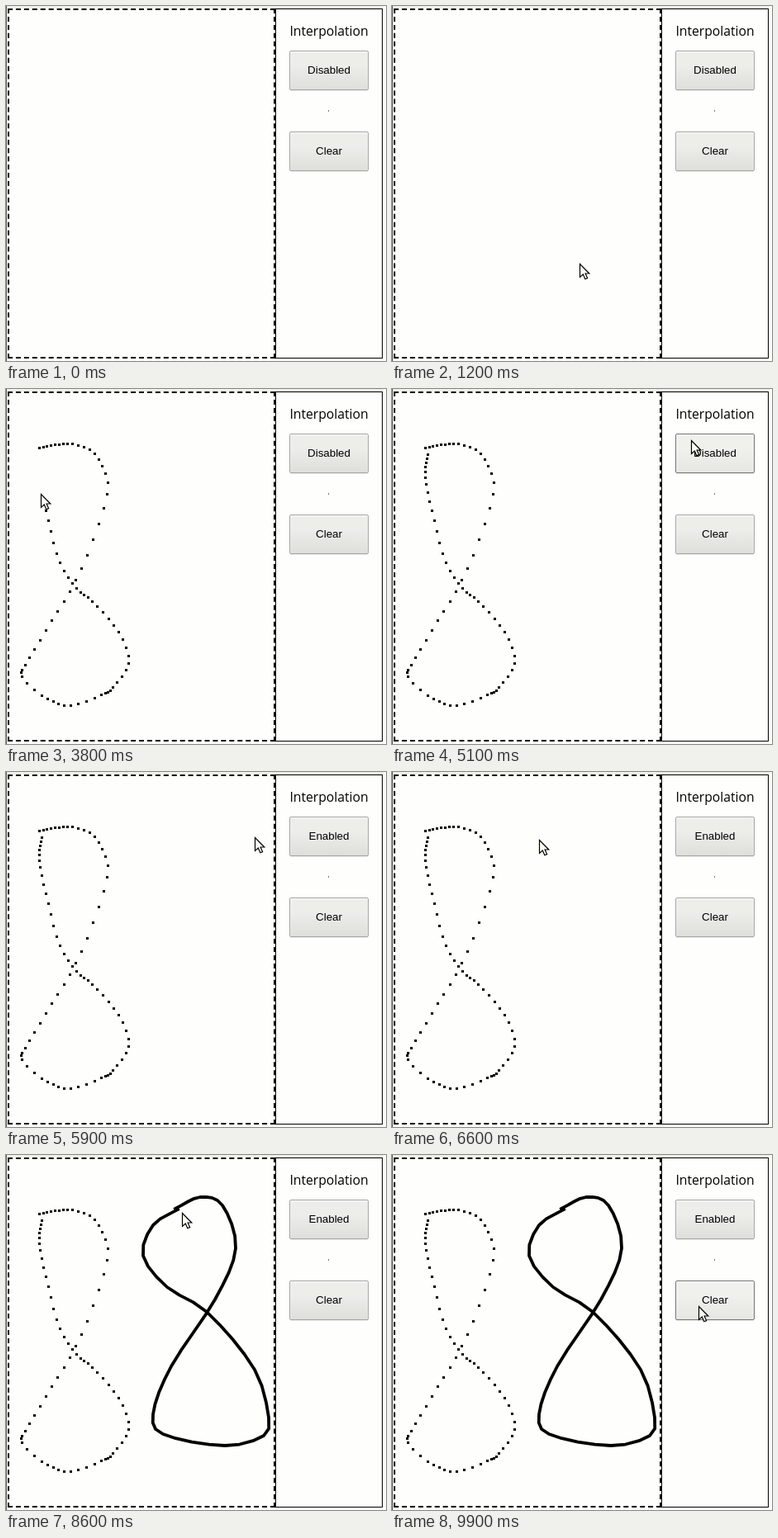
Write an HTML page that moves like this. It is 460 px wide and 430 px high and loops after 10 s.

```html
<!DOCTYPE html>
<html lang="en">
<head>
<meta charset="utf-8">
<title>Interpolation</title>
<style>
html, body { margin: 0; width: 100%; height: 100%; overflow: hidden; background: #fefefc; }
body > * { position: absolute; box-sizing: border-box; }
.top { left: 0; top: 0; width: 457px; height: 3px; background: #f1f1e6; }
.left { left: 0; top: 0; width: 1px; height: 430px; background: #5c554a; }
.pad { left: 2px; top: 3px; width: 324px; height: 424px; border: 2px dashed #000; }
.panel { left: 326px; top: 3px; width: 130px; height: 424px; border: 1px solid #000; }
.title {
  left: 327px; top: 19px; width: 128px; text-align: center; color: #000;
  font: 15.7px/22px "Open Sans", "Noto Sans", sans-serif;
}
.btn {
  left: 343px; width: 96px; height: 48px; border: 1px solid #a5a5a3; border-radius: 2px;
  background: linear-gradient(#ededea, #ededea 38%, #dededa);
  box-shadow: 0 1px 0 rgba(0, 0, 0, .08), inset 0 1px 2px rgba(255, 255, 255, .75);
  color: #000; text-align: center;
  font: 13.33px/46px "Liberation Sans", Arial, sans-serif;
}
.btn.hover { border-color: #747472; background: linear-gradient(#f0f0ed, #f0f0ed 38%, #e6e6e2); }
#toggle { top: 54px; }
#clear { top: 152px; }
.speck { left: 390px; top: 126px; width: 1px; height: 2px; background: #777; }
svg { left: 0; top: 0; }
</style>
</head>
<body>
<div class="top"></div>
<div class="left"></div>
<div class="pad"></div>
<div class="panel"></div>
<div class="title">Interpolation</div>
<div class="btn" id="toggle">Disabled</div>
<div class="speck"></div>
<div class="btn" id="clear">Clear</div>
<svg width="460" height="430" viewBox="0 0 460 430">
  <path id="dots" shape-rendering="crispEdges"/>
  <polyline id="line" fill="none" stroke="#000" stroke-width="3.8" stroke-linejoin="round" stroke-linecap="square"/>
  <path id="cursor" d="M.5 .5V16.5L4.3 13L6.8 18.8L9.6 17.6L7.1 12H11.8Z" fill="#fffff4" stroke="#000" stroke-width="1.2"/>
</svg>
<script>
const LOOP = 10000, STEP = 100, TOGGLE = 5700;
const $ = id => document.getElementById(id);

// Each stroke is a smooth curve through [sample, x, y]; one sample per `pace` ms.
// The pointer runs `lead` samples ahead of the ink.
const dotted = {
  start: 2389, pace: 18.3, lead: 1.5,
  keys: [
    [0,40,71], [7,74,66], [11,101,73], [14,116,93], [17,122,127], [22,91,217],
    [28,48,292], [32,23,334], [35,19,348], [38,43,371], [43,78,383], [47,115,370],
    [51,129,361], [55,148,332], [59,136,294], [64,104,257], [68,85,241], [72,65,210],
    [77,48,147], [81,40,107], [86,43,79]
  ]
};
const solid = {
  start: 7400, pace: 20, lead: 2.5,
  keys: [
    [0,205,65], [4,235,51], [8,262,61], [12,278,113], [16,253,175], [20,200,256],
    [24,178,314], [27,190,338], [31,265,352], [34,312,340], [36,318,318], [39,301,260],
    [43,243,190], [46,195,160], [49,166,122], [52,178,85], [55,208,66]
  ]
};

// Pointer moves between strokes: [time, x, y]
const moves = [
  [400,310,432], [1100,290,392], [1500,38,72], [2300,38,70],
  [4000,43,78], [4200,150,30], [4400,352,66], [5100,362,62], [5800,362,62],
  [6200,118,130], [6600,178,82], [6700,178,82], [7200,188,73], [7300,188,73],
  [8500,207,66], [8900,230,80], [9500,395,310], [9800,371,183], [9900,371,183]
];

// Index of the key that opens the span holding v
function span(keys, v) {
  let i = 0;
  while (i < keys.length - 2 && keys[i + 1][0] <= v) i++;
  return i;
}

function lerp(keys, v) {
  const i = span(keys, v), a = keys[i], b = keys[i + 1];
  const s = Math.min(1, (v - a[0]) / (b[0] - a[0]));
  return [1, 2].map(c => a[c] + (b[c] - a[c]) * s);
}

// Cubic Hermite curve with tangents taken from the neighbouring keys
function curve(keys, v) {
  const last = keys.length - 1;
  v = Math.max(0, Math.min(keys[last][0], v));
  const i = span(keys, v), a = keys[i], b = keys[i + 1];
  const h = b[0] - a[0], s = (v - a[0]) / h, r = 1 - s;
  const slope = (k, c) => {
    const p = keys[Math.max(0, k - 1)], n = keys[Math.min(last, k + 1)];
    return (n[c] - p[c]) / (n[0] - p[0]);
  };
  return [1, 2].map(c =>
    r * r * (1 + 2 * s) * a[c] + s * s * (1 + 2 * r) * b[c] +
    h * s * r * (r * slope(i, c) - s * slope(i + 1, c)));
}

const end = stroke => stroke.keys[stroke.keys.length - 1][0];
const sampleAt = (stroke, t) => (t - stroke.start) / stroke.pace;

function ink(stroke, t) {
  const count = Math.min(end(stroke), Math.floor(sampleAt(stroke, t))) + 1;
  return Array.from({ length: Math.max(0, count) }, (_, i) => curve(stroke.keys, i));
}

function pointer(t) {
  if (t < moves[0][0]) return null;
  for (const s of [dotted, solid]) {
    const v = sampleAt(s, t);
    if (v >= 0 && v < end(s)) return curve(s.keys, v + s.lead).map(c => c - 2);
  }
  return lerp(moves, t);
}

function hover(id, top, p) {
  const inside = p && p[0] >= 343 && p[0] < 439 && p[1] >= top && p[1] < top + 48;
  $(id).classList.toggle("hover", !!inside);
}

function draw(t) {
  $("dots").setAttribute("d", ink(dotted, t)
    .map(([x, y]) => `M${Math.round(x) - 1} ${Math.round(y) - 1}h3v3h-3z`).join(""));
  $("line").setAttribute("points", ink(solid, t).join(" "));
  $("toggle").textContent = t < TOGGLE ? "Disabled" : "Enabled";

  const p = pointer(t);
  $("cursor").style.display = p ? "" : "none";
  if (p) $("cursor").setAttribute("transform", `translate(${p.map(Math.round)})`);
  hover("toggle", 54, p);
  hover("clear", 152, p);
}

const start = performance.now();
function tick() {
  const t = (performance.now() - start) % LOOP;
  draw(Math.floor(t / STEP) * STEP);
  requestAnimationFrame(tick);
}
tick();
</script>
</body>
</html>
```
